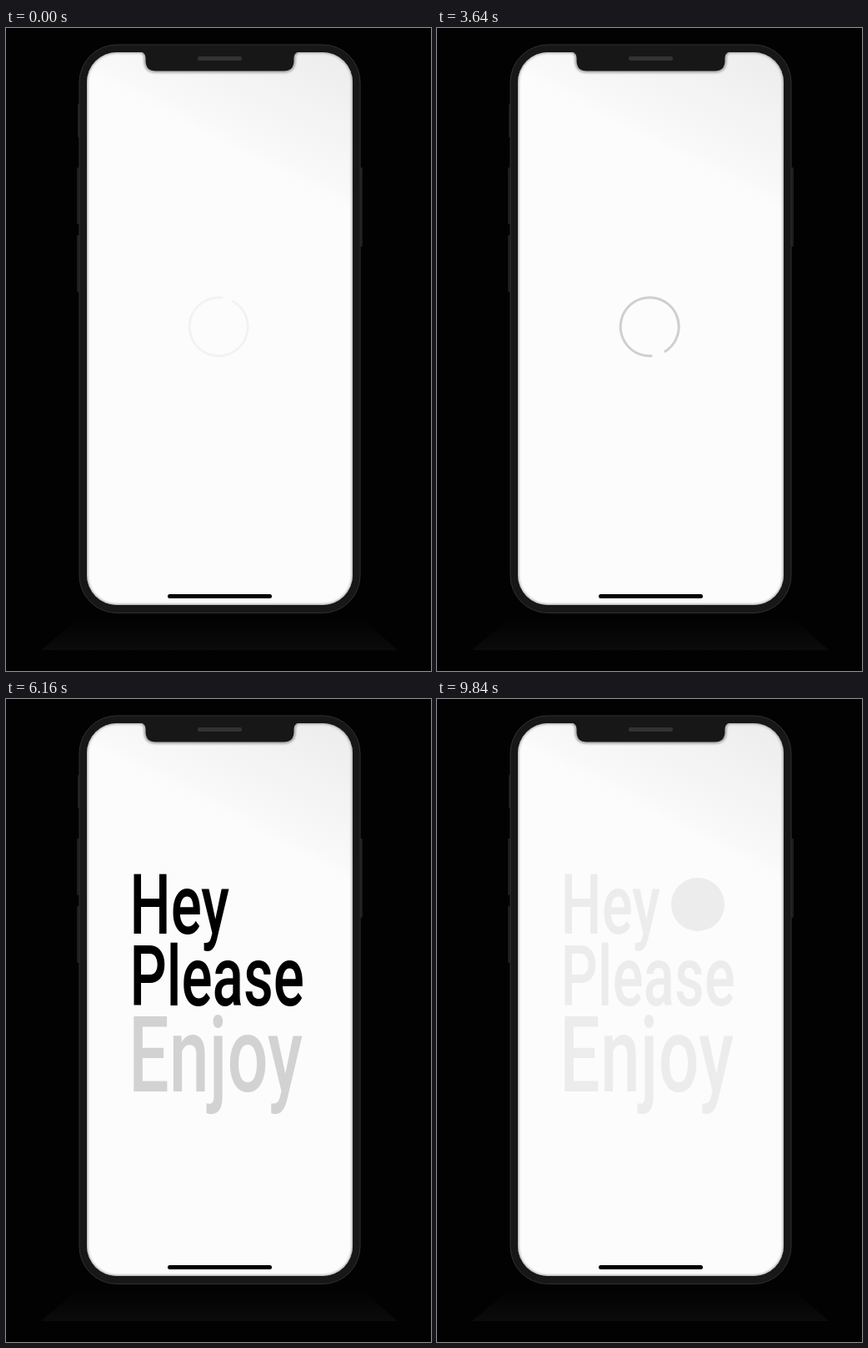
An HTML page for the animation above (9.96 s loop, 510 by 770 pixels).

```html
<!DOCTYPE html>
<html lang="en">
<head>
<meta charset="utf-8">
<style>
  html, body { margin: 0; width: 100%; height: 100%; overflow: hidden; background: #020202; }
  svg { display: block; }
  /* One condensed face for all lettering */
  text { font: 500 101px Roboto, sans-serif; transform: scaleX(.685); }
  .tall { font-size: 126px; }
</style>
</head>
<body>
<svg width="510" height="770" viewBox="0 0 510 770">
  <defs>
    <linearGradient id="floor" x2="0" y2="1">
      <stop stop-color="#020202"/><stop offset="1" stop-color="#0b0b0b"/>
    </linearGradient>
    <linearGradient id="glare" gradientUnits="userSpaceOnUse" x1="330" y1="175" x2="408" y2="25">
      <stop stop-color="#fcfcfc"/><stop offset=".1" stop-color="#f9f9f9"/><stop offset="1" stop-color="#ececec"/>
    </linearGradient>
    <filter id="soft"><feGaussianBlur stdDeviation="1.6"/></filter>
    <clipPath id="screen"><rect x="97" y="29" width="319" height="662" rx="36"/></clipPath>
  </defs>

  <path d="M87 707H427L470 745H42Z" fill="url(#floor)"/>
  <g fill="#1d1d1d">
    <rect x="86" y="91" width="3" height="40" rx="1"/>
    <rect x="85" y="167" width="3" height="68" rx="1"/>
    <rect x="85" y="248" width="3" height="68" rx="1"/>
    <rect x="425" y="167" width="3" height="95" rx="1"/>
  </g>
  <rect x="88" y="20" width="337" height="680.5" rx="45" fill="#171717" stroke="#303030"/>

  <g clip-path="url(#screen)">
    <rect x="97" y="29" width="319" height="662" fill="url(#glare)"/>
    <g filter="url(#soft)" fill="none" stroke="#888" stroke-width="2.5">
      <rect x="96.5" y="28.5" width="320" height="663" rx="36"/>
      <path d="M163 29Q167 30 167 36V39Q167 52 180 52H333Q346 52 346 39V36Q346 30 350 29"/>
    </g>
  </g>
  <path d="M162 28.500Q167.500 30 167.500 36V39Q167.500 51.500 180 51.500H333Q345.500 51.500 345.500 39V36Q345.500 30 351 28.500Z" fill="#171717"/>
  <rect x="230" y="34" width="53" height="5" rx="2" fill="#333"/>
  <rect x="194" y="678" width="125" height="5" rx="2.500"/>

  <path id="spinner" fill="none" stroke="#000" stroke-width="3"/>
  <g id="greeting">
    <g transform="translate(148.500 281)"><text>Hey</text></g>
    <g transform="translate(148.500 367)"><text>Please</text></g>
    <g transform="translate(147 470)"><text class="tall">Enjoy</text></g>
    <circle cx="313" cy="246" r="32"/>
  </g>
</svg>
<script>
const LOOP = 9960;
const spinner = document.getElementById("spinner");
const greeting = document.getElementById("greeting");
const fadeInStarts = [4000, 4960, 6000, 7000];

const clamp = v => Math.min(1, Math.max(0, v));
const smooth = v => (v = clamp(v)) * v * (3 - 2 * v);

function pointAt(degrees) {
  const a = degrees * Math.PI / 180;
  return `${255.2 + 35 * Math.cos(a)} ${357.7 + 35 * Math.sin(a)}`;
}

function drawSpinner(t) {
  const tail = -63 + 508 * smooth(t / 1620);
  const head = 279 + 193 * smooth(t / 1700) + 308 * smooth((t - 1600) / 2080);
  const large = head - tail > 180 ? 1 : 0;
  spinner.setAttribute("d", `M${pointAt(tail)}A35 35 0 ${large} 1 ${pointAt(head)}`);
  spinner.style.opacity = clamp((t + 40) / 1000) * clamp((4000 - t) / 2000);
}

function frame() {
  const t = performance.now() % LOOP;
  drawSpinner(t);
  greeting.style.opacity = clamp((LOOP - t) / 2000);
  fadeInStarts.forEach((start, i) => {
    greeting.children[i].style.opacity = clamp((t - start) / 1000);
  });
  requestAnimationFrame(frame);
}
frame();
</script>
</body>
</html>
```
